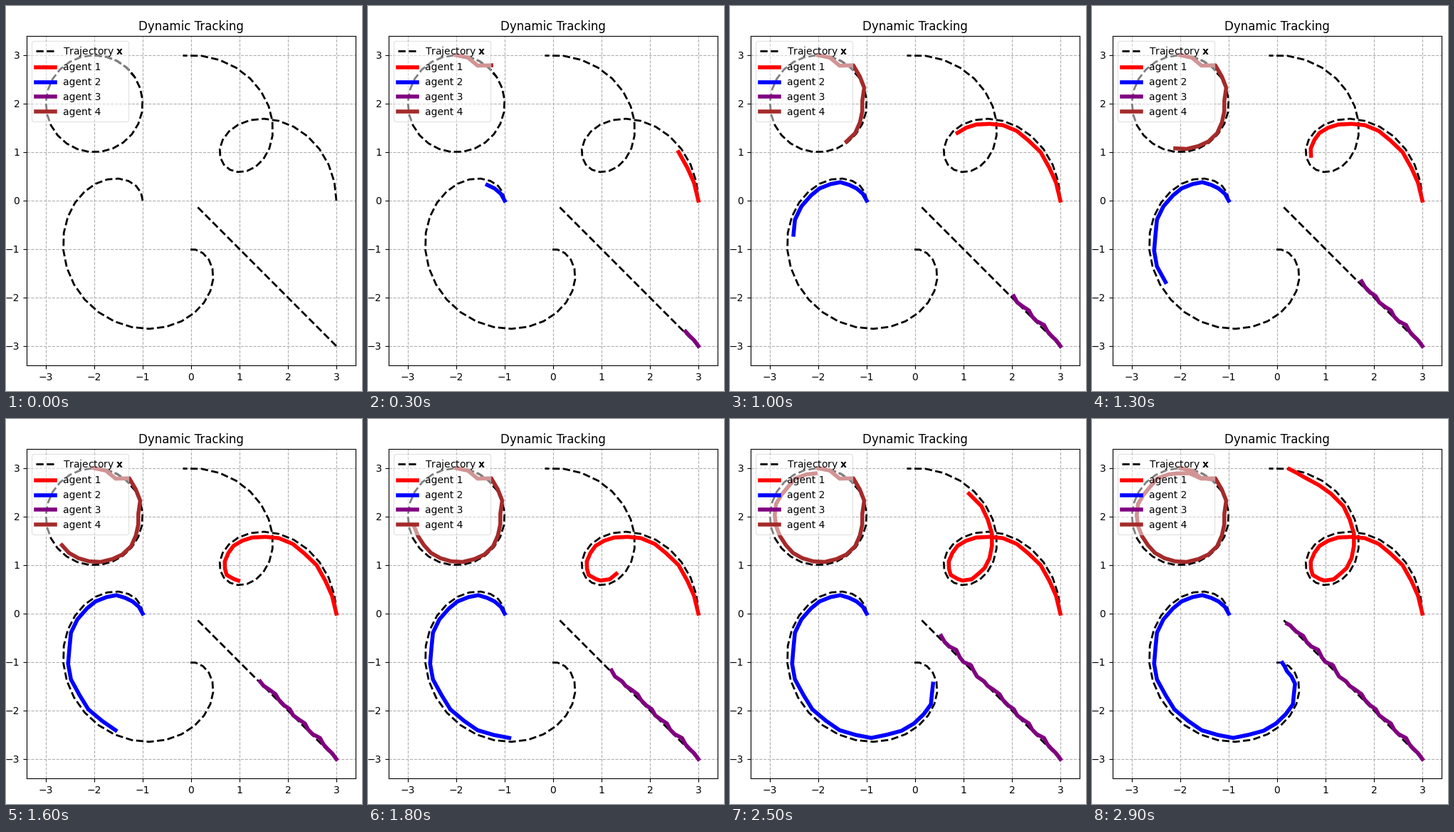
Recreate the animation shown at these times as a matplotlib script. Size 500 by 540 pixels, loop 3 s.

```python
import numpy as np
import matplotlib.pyplot as plt
from matplotlib.animation import FuncAnimation

W, H, DPI = 500, 540, 100
STEPS = 30
SIDE = 462          # axes size in pixels
SCALE = 68          # pixels per data unit


def loop(t):
    arm = np.exp(2.75j * t)
    return 2 * np.exp(0.55j * t) + arm, arm


def spiral(t):
    arm = np.exp(2.75j * t)
    return -2 * np.exp(0.55j * t) + arm, arm


def line(t):
    normal = -(1 + 1j) / np.sqrt(2)
    return 3 - 3j + (-1 + 1j) * t, normal


def circle(t):
    arm = 1j * np.exp(-2.5j * t)
    return -2 + 2j + arm, arm


step = np.arange(STEPS)
t = step * 0.1
curves = [loop, spiral, line, circle]
colors = ["red", "blue", "purple", "brown"]

# How far each agent cuts inside its curve
insets = [
    0.1,
    0.1,
    0.026 + 0.026 * np.cos(2 * np.pi * (step - 1) / 3),
    np.interp(step, [0, 2, 3, 4, 6, 8, 10, 14],
              [0, 0.1, -0.06, -0.06, 0.1, 0.05, 0, 0.1]),
]

# Agents leave from the curve, slow down at the end and return to it
agent_time = np.where(t > 2.7, 2.7 + 0.45 * (t - 2.7), t)
ease = np.clip(np.minimum(step, STEPS - 1 - step) / 2, 0, 1)
rng = np.random.default_rng(4)


def track(curve, inset):
    point, arm = curve(agent_time)
    noise = rng.normal(0, 0.012, (2, STEPS))
    return point + ease * (noise[0] + 1j * noise[1] - inset * arm)


paths = [track(curve, inset) for curve, inset in zip(curves, insets)]

fig = plt.figure(figsize=(W / DPI, H / DPI), dpi=DPI, facecolor="white")
ax = fig.add_axes([29 / W, 36 / H, SIDE / W, SIDE / H])
limit = SIDE / 2 / SCALE
ax.set_xlim(-limit, limit)
ax.set_ylim(-limit, limit)
ax.set_xticks(range(-3, 4))
ax.set_yticks(range(-3, 4))
ax.set_title("Dynamic Tracking")
ax.grid(linestyle="--")
ax.set_axisbelow(True)

for i, curve in enumerate(curves):
    z = curve(t)[0]
    label = r"Trajectory $\mathbf{x}$" if i == 0 else None
    ax.plot(z.real, z.imag, "--", color="black", lw=2, label=label)
agents = [ax.plot([], [], color=c, lw=4, label=f"agent {i}")[0]
          for i, c in enumerate(colors, 1)]
ax.legend(loc="upper left", framealpha=0.5)


def draw(frame):
    for agent, path in zip(agents, paths):
        z = path[:frame + 1]
        agent.set_data(z.real, z.imag)
    return agents


anim = FuncAnimation(fig, draw, frames=STEPS, interval=100, repeat=True,
                     repeat_delay=0)
plt.show()
```
